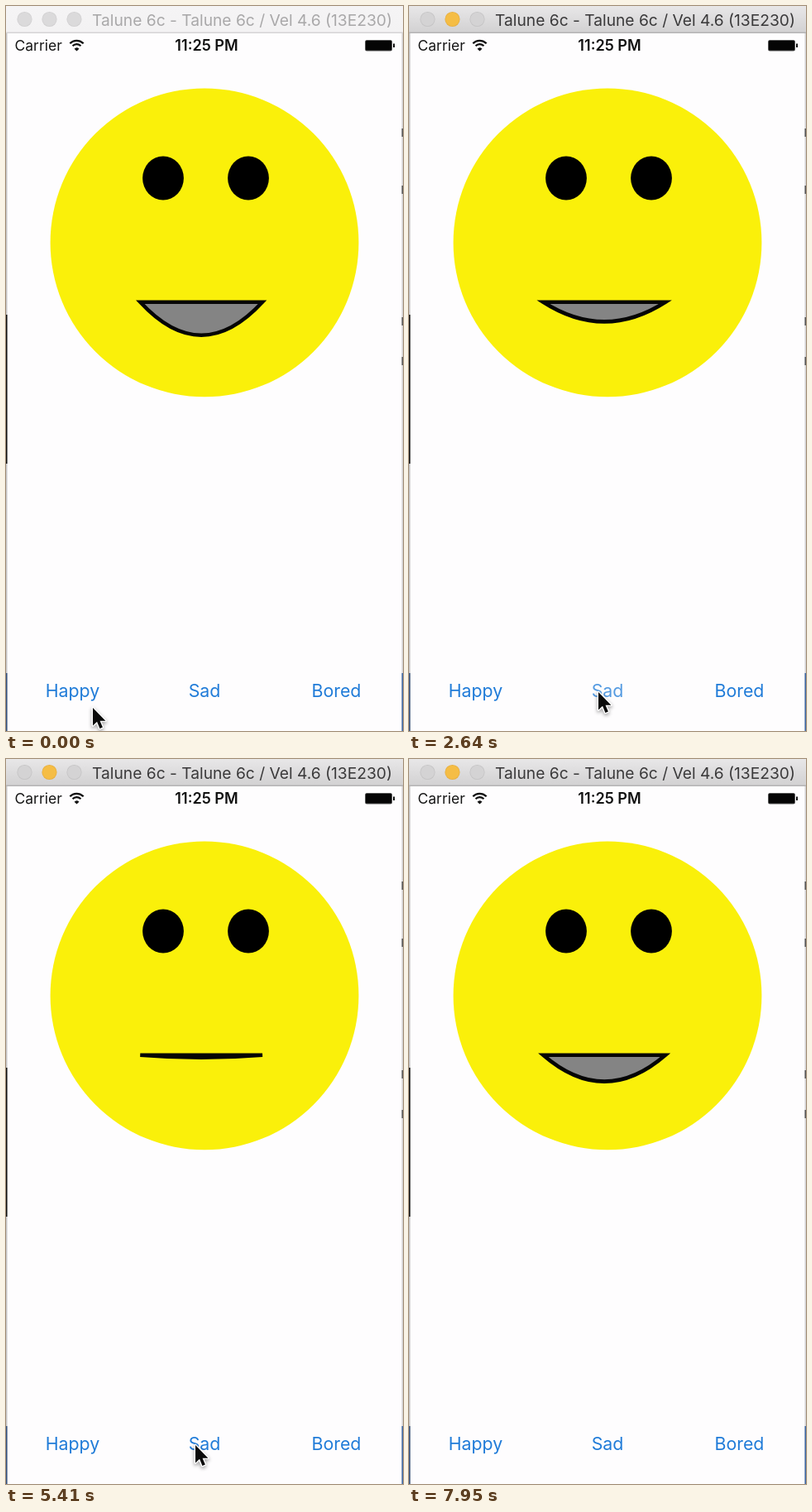
Animation, 480 px wide and 876 px high, one loop 8000 ms. Source, as an HTML page with a canvas:

```html
<!DOCTYPE html>
<html lang="en">
<head>
<meta charset="utf-8">
<title>Mood face</title>
<style>
html, body { margin: 0; width: 100%; height: 100%; overflow: hidden; background: #fefdfe; }
canvas { display: block; width: 480px; height: 876px; }
</style>
</head>
<body>
<canvas id="stage" width="480" height="876"></canvas>
<script>
const ctx = document.getElementById('stage').getContext('2d');
const LOOP = 8000;
const FONT = 'Inter, Roboto, sans-serif';
const MORPH = 1000, PRESS = 90, FADE = 320, TRAVEL = 500;

// mood is the bulge of the lip; tip is where the pointer rests
const happy = { label: 'Happy', x: 80.5, mood: 40, tip: { x: 79, y: 829 } };
const sad = { label: 'Sad', x: 240, mood: -34, tip: { x: 229, y: 829 } };
const bored = { label: 'Bored', x: 399.5, mood: 3, tip: { x: 400, y: 829 } };
const buttons = [happy, sad, bored];

// The pointer leaves for a button, then taps it
const visits = [
  { button: happy, leave: 450, tap: 1150 },
  { button: sad, leave: 1680, tap: 2420 },
  { button: bored, leave: 3290, tap: 4320 },
  { button: sad, leave: 4850, tap: 5550 },
  { button: happy, leave: 5850, tap: 7060 }
];
const entry = { x: 105, y: 848 };
const exit = { x: 338, y: 888, leave: 7250 };

const clamp = v => Math.max(0, Math.min(1, v));
const mix = (a, b, k) => a + (b - a) * k;
const smooth = k => k * k * (3 - 2 * k);

function rect(x, y, w, h, color) {
  ctx.fillStyle = color;
  ctx.fillRect(x, y, w, h);
}

function oval(x, y, rx, ry, color) {
  ctx.beginPath();
  ctx.ellipse(x, y, rx, ry, 0, 0, Math.PI * 2);
  ctx.fillStyle = color;
  ctx.fill();
}

function text(str, x, y, size, color, weight = 400, align = 'center') {
  ctx.font = `${weight} ${size}px ${FONT}`;
  ctx.textAlign = align;
  ctx.fillStyle = color;
  ctx.fillText(str, x, y);
}

function mouthDepth(t) {
  return visits.reduce(
    (depth, { button, tap }) => mix(depth, button.mood, clamp((t - tap) / MORPH)),
    happy.mood
  );
}

function buttonAlpha(t, button) {
  const held = visits.find(v => v.button === button && t >= v.tap - PRESS && t < v.tap + FADE);
  return held ? mix(0.25, 1, clamp((t - held.tap) / FADE)) : 1;
}

function pointerAt(t) {
  const stops = [...visits.map(v => ({ ...v.button.tip, leave: v.leave })), exit];
  let { x, y } = entry;
  for (const stop of stops) {
    const k = smooth(clamp((t - stop.leave) / TRAVEL));
    x = mix(x, stop.x, k);
    y = mix(y, stop.y, k) + 8 * Math.sin(Math.PI * k);
  }
  return { x, y };
}

function drawTitleBar(active) {
  const shade = ctx.createLinearGradient(0, 0, 0, 32);
  shade.addColorStop(0, active ? '#e8e7e8' : '#f5f4f5');
  shade.addColorStop(1, active ? '#d2d1d2' : '#f3f2f3');
  rect(0, 0, 480, 32, shade);
  rect(0, 31.5, 480, 1.5, active ? '#b5b4b5' : '#d5d4d5');
  for (let i = 0; i < 3; i++) {
    const x = 22.5 + 30 * i, lit = active && i === 1;
    oval(x, 16, 9.1, 9.1, lit ? '#e6ae40' : active ? '#c4c3c4' : '#d0cfd0');
    oval(x, 16, 8.3, 8.3, lit ? '#f5bd45' : active ? '#d4d3d4' : '#dbdadb');
  }
  text('Talune 6c - Talune 6c / Vel 4.6 (13E230)', 285.5, 23.5, 19.2, active ? '#3a393a' : '#a9a8a9');
}

function drawStatusBar() {
  text('Carrier', 10.5, 54, 17.5, '#161616', 400, 'left');
  text('11:25 PM', 242.5, 54, 18.1, '#111', 600);

  ctx.strokeStyle = ctx.fillStyle = '#111';
  ctx.lineWidth = 2.2;
  for (const r of [6.8, 11.2]) {
    ctx.beginPath();
    ctx.arc(85.5, 53, r, -Math.PI * 0.76, -Math.PI * 0.24);
    ctx.stroke();
  }
  ctx.beginPath();
  ctx.moveTo(85.5, 54.5);
  ctx.arc(85.5, 54.5, 4, -Math.PI * 0.76, -Math.PI * 0.24);
  ctx.fill();

  ctx.beginPath();
  ctx.roundRect(434, 41, 33, 13.5, 2.5);
  ctx.fillStyle = '#555';
  ctx.fill();
  rect(435, 42, 31, 11.5, '#050505');
  rect(468, 45.5, 2, 4.5, '#111');
}

function drawFace(depth) {
  const left = 162.3, right = 310, lip = 357.7;
  ctx.save();
  ctx.filter = 'blur(0.5px)';
  oval(240, 285.9, 186.4, 186.4, '#faf00a');
  for (const x of [190, 293]) oval(x, 208, 24.9, 26.4, '#000');

  ctx.beginPath();
  ctx.moveTo(left, lip);
  ctx.quadraticCurveTo((left + right) / 2, lip + depth * 2, right, lip);
  ctx.closePath();
  ctx.fillStyle = '#848484';
  ctx.fill();
  ctx.strokeStyle = '#050505';
  ctx.lineWidth = 4.6;
  ctx.stroke();
  ctx.restore();
}

function drawEdges() {
  rect(0, 33, 1.5, 843, '#c4c3c4');
  rect(0, 373, 1.5, 180, '#111');
  rect(0, 806, 1.5, 70, '#34517f');
  rect(478.5, 33, 1.5, 843, '#d3d2d3');
  rect(478.5, 806, 1.5, 70, '#3c67a4');
  for (const y of [148, 217, 376, 424]) rect(478.5, y, 1.5, 10, '#555');
}

function drawPointer({ x, y }) {
  ctx.save();
  ctx.translate(x, y);
  ctx.scale(1.4, 1.4);
  const arrow = new Path2D('M0 0V15.3L3.6 12 6 17.8 8.5 16.8 6.1 11.2H11Z');
  ctx.lineJoin = 'round';
  ctx.lineWidth = 2;
  ctx.strokeStyle = '#fff';
  ctx.shadowColor = 'rgba(0, 0, 0, 0.4)';
  ctx.shadowBlur = 4;
  ctx.shadowOffsetY = 2;
  ctx.stroke(arrow);
  ctx.shadowColor = 'transparent';
  ctx.fillStyle = '#0a0a0a';
  ctx.fill(arrow);
  ctx.restore();
}

function draw(t) {
  rect(0, 0, 480, 876, '#fefdfe');
  drawEdges();
  drawTitleBar(t >= visits[0].tap);
  drawStatusBar();
  drawFace(mouthDepth(t));
  for (const button of buttons) {
    ctx.globalAlpha = buttonAlpha(t, button);
    text(button.label, button.x, 835, 21.3, '#1f7bd8');
  }
  ctx.globalAlpha = 1;
  drawPointer(pointerAt(t));
}

function tick() {
  draw(performance.now() % LOOP);
  requestAnimationFrame(tick);
}
tick();
</script>
</body>
</html>
```
